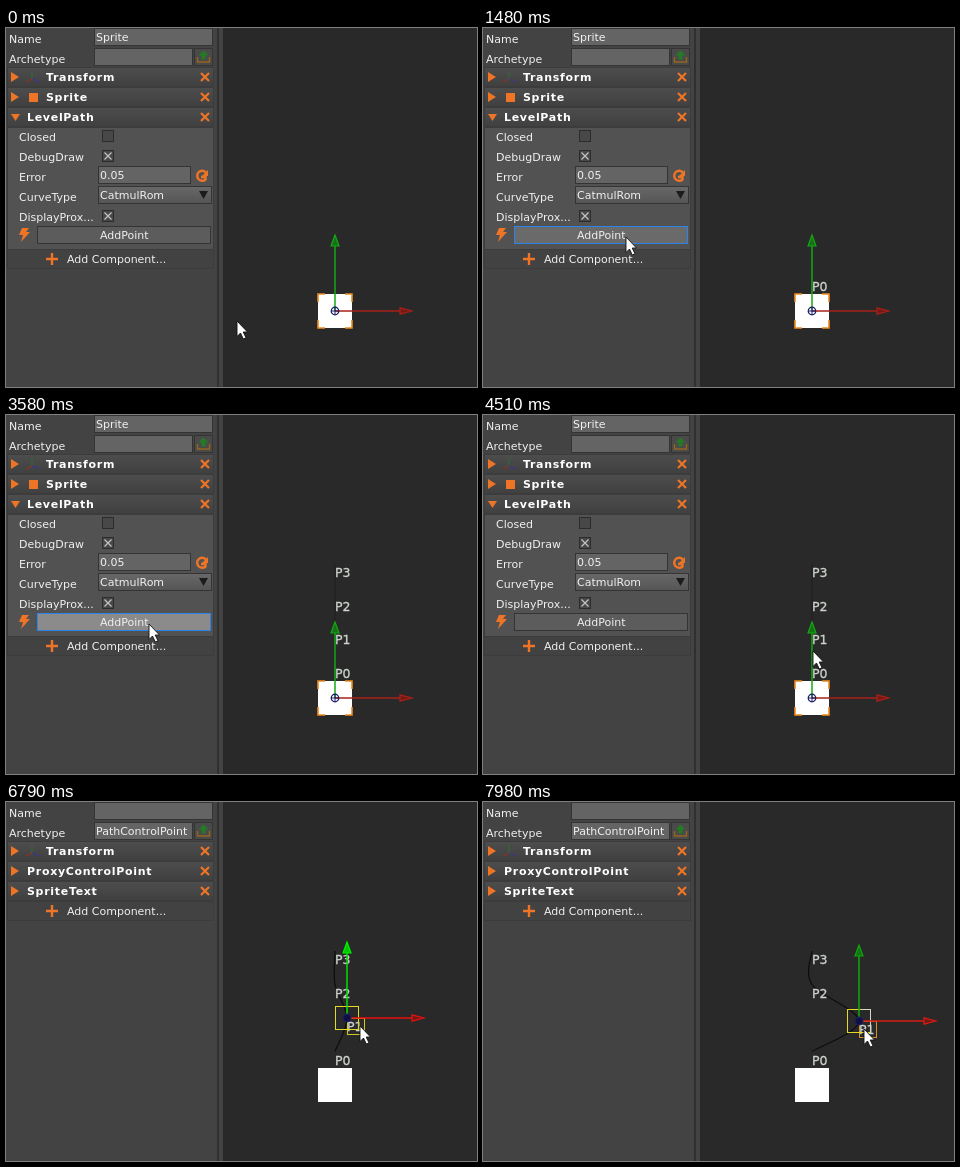
Write an HTML page that moves like this. It is 471 by 359 pixels and loops after 8000 ms.

```html
<!DOCTYPE html>
<html lang="en">
<head>
<meta charset="utf-8">
<title>Level path editor</title>
<style>
html, body { margin: 0; width: 100%; height: 100%; overflow: hidden; background: #292929; }
svg { display: block; width: 471px; height: 359px; }
text { font: 11px "DejaVu Sans", Verdana, sans-serif; fill: #f0f0f0; white-space: pre; }
.head { font-weight: bold; letter-spacing: .7px; fill: #fff; }
.label { font-size: 12.5px; fill: #cdd3cd; stroke: #cdd3cd; stroke-width: .3; }
.crisp { shape-rendering: crispEdges; }
.icon { stroke: #ee7426; fill: none; }
.solid { fill: #ee7426; }
</style>
</head>
<body>
<svg id="stage" viewBox="0 0 471 359">
  <defs>
    <linearGradient id="bar" x2="0" y2="1">
      <stop stop-color="#4d4d4d"/><stop offset="1" stop-color="#404040"/>
    </linearGradient>
    <linearGradient id="drop" x2="0" y2="1">
      <stop stop-color="#686868"/><stop offset="1" stop-color="#555"/>
    </linearGradient>
  </defs>
  <rect width="471" height="359" fill="#292929"/>
  <rect width="217" height="359" fill="#434343"/>
  <rect x="211" width="2" height="359" fill="#303030"/>
  <g id="common"></g>
  <g id="spritePanel"></g>
  <g id="pointPanel"></g>
  <g id="scene">
    <rect class="crisp" x="312" y="266" width="34" height="34" fill="#fff"/>
    <path id="corners" fill="none" stroke="#ee8a20" stroke-width="1.6"
      d="M319 266H312V274M339 266H346V274M319 300H312V292M339 300H346V292"/>
    <path id="curve" fill="none" stroke="#0c0c0c" stroke-width="1.2"/>
    <g id="labels"></g>
    <g id="gizmo" stroke-width="1.5">
      <g id="pick" class="crisp" fill="none" stroke-width="1">
        <rect id="tag" x=".5" y=".5" width="17" height="16"/>
        <rect id="box" x="-11.5" y="-11.5" width="23" height="23"/>
        <path id="boxLight" d="M2 -11.5H11.5V11.5" stroke="#d9d6bd"/>
      </g>
      <path id="lineY" d="M0 0V-65"/>
      <path id="headY" stroke-width="1.2" d="M0 -76L4 -65H-4Z"/>
      <path id="lineX" d="M0 0H65"/>
      <path id="headX" stroke-width="1.2" d="M77 0L65 3.2V-3.2Z"/>
      <circle id="hub" r="3.8" stroke-width="1.2"/>
      <path id="cross" d="M-4 0H4M0 -4V4" stroke="#1a1a66" stroke-width="1"/>
    </g>
  </g>
  <path id="cursor" d="M0 0V15.5L3.5 12L6.3 18L9 16.8L6.2 11H10.5Z" fill="#fff" stroke="#111" stroke-width=".9"/>
</svg>
<script>
const $ = id => document.getElementById(id);
const LOOP = 8000, STEP = 80;

const text = (x, y, s, more = '') => `<text x="${x}" y="${y}" ${more}>${s}</text>`;
const rect = (x, y, w, h, fill, stroke = 'none', more = '') =>
  `<rect class="crisp" x="${x + .5}" y="${y + .5}" width="${w}" height="${h}" fill="${fill}" stroke="${stroke}" ${more}/>`;
const field = (x, y, w, h) => rect(x, y, w, h, '#646464', '#343434');

function header(y, name, x, open) {
  const arrow = open ? `M5 ${y + 7}h9l-4.5 7z` : `M5 ${y + 5}v10l8 -5z`;
  return rect(1, y, 206, 19, 'url(#bar)', '#3c3c3c') +
    `<path class="solid" d="${arrow}"/>` +
    `<path class="icon" stroke-width="2.2" d="M195 ${y + 6}l8 8m0 -8l-8 8"/>` +
    text(x, y + 14, name, 'class="head"');
}
const axes = y => `<path d="M26 ${y + 4}v8" stroke="#2f7030"/><path d="M26 ${y + 12}l8 3" stroke="#35359a"/>` +
  `<path d="M26 ${y + 12}l-6 3" stroke="#9a2f25"/>`;
const addRow = y => rect(1, y, 206, 19, '#424242', '#3c3c3c') +
  `<path class="icon" stroke-width="2.4" d="M40 ${y + 10}h12m-6 -6v12"/>` + text(61, y + 14, 'Add Component...');
const check = (y, on) => rect(96, y, 11, 11, '#484848', '#2c2c2c') +
  (on ? `<path d="M98.5 ${y + 2.5}l7 7m0 -7l-7 7" stroke="#c4c4c4" stroke-width="1.2"/>` : '');

$('common').innerHTML = text(3, 15, 'Name') + field(88, 0, 118, 17) +
  text(3, 35, 'Archetype') + field(88, 20, 98, 17) + rect(188, 20, 18, 17, '#4a4a4a', '#343434') +
  '<path d="M191.5 29V34H203.5V29" fill="none" stroke="#96641f" stroke-width="1.4"/>' +
  '<path d="M197.5 22.5l5 5h-3v4h-4v-4h-3z" fill="#257a25"/>';

$('spritePanel').innerHTML = text(90, 13, 'Sprite') +
  header(39, 'Transform', 40) + axes(39) +
  header(59, 'Sprite', 40) + '<rect class="crisp solid" x="23" y="65" width="9" height="9"/>' +
  header(79, 'LevelPath', 21, true) + rect(1, 99, 206, 122, '#525252', '#3c3c3c') +
  ['Closed', 'DebugDraw', 'Error', 'CurveType', 'DisplayProx...'].map((s, i) => text(13, 113 + 20 * i, s)).join('') +
  check(102, false) + check(122, true) + check(182, true) +
  field(92, 138, 92, 17) + text(94, 151, '0.05') +
  '<path class="icon" stroke-width="2.4" d="M200 144.5A5 5 0 1 0 199.5 151.5V149H195"/><path class="solid" d="M202 142v6h-6z"/>' +
  rect(92, 158, 113, 17, 'url(#drop)', '#343434') + text(94, 171, 'CatmulRom') +
  '<path d="M193 163h9l-4.5 8z" fill="#1c1c1c"/>' +
  '<path class="solid" d="M16 200h7l-3 4h4l-9 10l2 -7h-4z"/>' +
  rect(31, 198, 173, 17, '#5a5a5a', '#343434', 'id="button"') + text(94, 211, 'AddPoint') + addRow(221);

$('pointPanel').innerHTML = text(90, 33, 'PathControlPoint') +
  header(39, 'Transform', 40) + axes(39) +
  header(59, 'ProxyControlPoint', 21) + header(79, 'SpriteText', 21) + addRow(99);

$('labels').innerHTML = [0, 1, 2, 3].map(i => text(0, 0, 'P' + i, 'class="label"')).join('');
const labels = [...$('labels').children];

// Pointer moves: start, number of steps, end x, end y
const MOVES = [
  [80, 7, 143, 209],
  [4350, 3, 330, 236], [4590, 6, 342, 224],
  [6070, 5, 334, 224],
  [6630, 2, 346, 224], [6790, 1, 354, 224], [6870, 4, 376, 230], [7190, 3, 379, 227],
  [7900, 1, 381, 227]
];
// Button presses: down, up; each release adds a point
const PRESSES = [[790, 1020], [1480, 1720], [2490, 2960], [3190, 3580]];
const LEAVE = 4350, SELECT = 5220, DRAG = 6630;

function pointer(t) {
  let x = 231, y = 293;
  for (const [start, n, ex, ey] of MOVES) {
    if (t < start) break;
    const step = start === 80 ? 78 : STEP;
    const k = Math.min(1, (Math.floor((t - start) / step) + 1) / n);
    x += (ex - x) * k;
    y += (ey - y) * k;
  }
  return [Math.round(x), Math.round(y)];
}

function catmullRom(p) {
  let d = `M${p[0]}`;
  for (let i = 0; i < p.length - 1; i++) {
    const a = p[i - 1] || p[i], b = p[i], c = p[i + 1], e = p[i + 2] || c;
    const ctrl = (q, u, v, s) => q.map((z, j) => z + s * (v[j] - u[j]) / 6);
    d += `C${ctrl(b, a, c, 1)} ${ctrl(c, b, e, -1)} ${c}`;
  }
  return d;
}

const show = (id, on) => $(id).setAttribute('display', on ? 'inline' : 'none');
const paint = (id, stroke, fill = 'none') => {
  $(id).setAttribute('stroke', stroke);
  $(id).setAttribute('fill', fill);
};
const place = (el, [x, y]) => el.setAttribute('transform', `translate(${x} ${y})`);

function draw(t) {
  const selected = t >= SELECT, dragging = t >= DRAG, settled = t >= 7900;
  const [cx, cy] = pointer(t);
  place($('cursor'), [cx, cy]);

  show('spritePanel', !selected);
  show('pointPanel', selected);
  show('corners', !selected);
  show('pick', selected);
  show('boxLight', settled);
  show('cross', !selected);

  const hover = t >= 470 && t < LEAVE;
  const pressed = PRESSES.some(([a, b]) => t >= a && t < b);
  const focus = t >= PRESSES[0][0] && t < LEAVE;
  paint('button', focus ? '#2d84e8' : '#343434', pressed ? '#6a6a6a' : hover ? '#8b8b8b' : '#5c5c5c');

  const count = PRESSES.filter(p => t >= p[1]).length;
  const points = [249.5, 216, 182.5, 149].map(y => [329, y]);
  if (dragging) {
    const [px, py] = pointer(t - STEP);
    points[1] = [px - 5, py - 8];
  }
  labels.forEach((el, i) => {
    el.setAttribute('display', i < count ? 'inline' : 'none');
    place(el, [points[i][0], points[i][1] + 13]);
  });
  $('curve').setAttribute('d', count > 1 ? catmullRom(points.slice(0, count)) : '');
  $('curve').setAttribute('opacity', selected ? 1 : .3);

  place($('gizmo'), selected ? points[1] : [329, 283]);
  const green = !selected ? '#14a814' : settled ? '#0ca80c' : dragging ? '#00e000' : '#0b6a0b';
  const red = !selected ? '#a8201a' : settled ? '#d81c14' : '#e81010';
  const bright = selected && !settled;
  paint('lineY', green);
  paint('headY', bright ? '#00f000' : green, bright ? '#00c800' : '#177017');
  paint('lineX', red);
  paint('headX', red, '#741a14');
  paint('hub', '#1a1a66', selected ? '#101040' : 'none');
  paint('box', t >= 6310 ? '#e6d820' : '#f2f2e6');
  paint('tag', settled ? '#d8912c' : dragging ? '#d8c81c' : '#7c1c18');
}

const origin = performance.now();
function frame() {
  draw((performance.now() - origin) % LOOP);
  requestAnimationFrame(frame);
}
frame();
</script>
</body>
</html>
```
